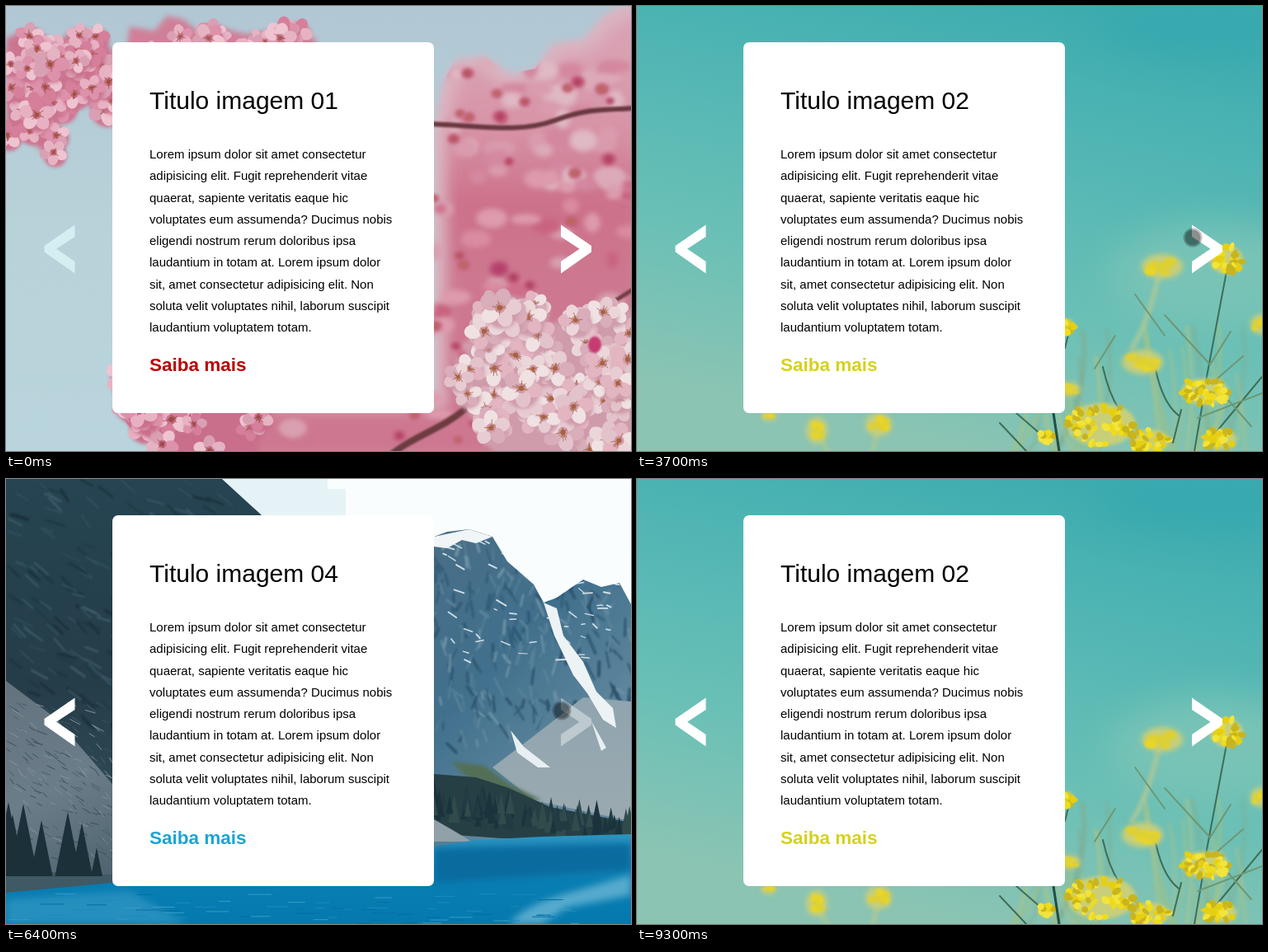
Write an HTML page with a canvas that moves like this. It is 758 px wide and 540 px high and loops after 10 s.

```html
<!DOCTYPE html>
<html lang="pt">
<head>
<meta charset="utf-8">
<style>
html, body { margin: 0; width: 100%; height: 100%; overflow: hidden; }
#stage { position: relative; width: 758px; height: 540px; overflow: hidden; }
#stage > * { position: absolute; left: 0; top: 0; }
#stage > #card { left: 129px; top: 44px; width: 390px; height: 450px; border-radius: 7px;
  background: #fff; color: #000; font-family: "Liberation Sans", Arial, sans-serif; white-space: nowrap; }
#card > * { position: absolute; left: 45px; margin: 0; }
h1 { top: 56px; font: 30px/30px "Liberation Sans", Arial, sans-serif; }
p { top: 123px; font-size: 15px; line-height: 26.25px; }
b { top: 380px; font-size: 22.5px; line-height: 24px; }
</style>
</head>
<body>
<div id="stage">
  <div id="card">
    <h1 id="title"></h1>
    <p>Lorem ipsum dolor sit amet consectetur<br>adipisicing elit. Fugit reprehenderit vitae<br>quaerat, sapiente veritatis eaque hic<br>voluptates eum assumenda? Ducimus nobis<br>eligendi nostrum rerum doloribus ipsa<br>laudantium in totam at. Lorem ipsum dolor<br>sit, amet consectetur adipisicing elit. Non<br>soluta velit voluptates nihil, laborum suscipit<br>laudantium voluptatem totam.</p>
    <b id="more">Saiba mais</b>
  </div>
  <svg width="758" height="540">
    <path id="prev" d="M83.5 265.5L46.5 291V298.5L83.5 324.5V310L61 294.8L83.5 280Z"/>
    <rect id="mark" x="673" y="265" width="37" height="60" fill="#9fa7a9"/>
    <path id="next" d="M673 265.5L710 291V298.5L673 324.5V310L695.5 294.8L673 280Z"/>
    <g id="cursor">
      <circle r="11.5" fill="#000" opacity=".24"/>
      <circle r="9.5" fill="#000" opacity=".27"/>
    </g>
  </svg>
</div>
<script>
const W = 758, H = 540, TAU = Math.PI * 2;
const el = id => document.getElementById(id);
let seed = 7;
const rnd = (a = 0, b = 1) => {
  seed = (seed * 16807) % 2147483647;
  return a + (b - a) * seed / 2147483647;
};
const pick = list => list[Math.floor(rnd() * list.length)];
const times = (n, fn) => { for (let i = 0; i < n; i++) fn(i); };

let g;
function fill(color, d) { g.fillStyle = color; g.fill(new Path2D(d)); }
function line(color, width, d) { g.strokeStyle = color; g.lineWidth = width; g.stroke(new Path2D(d)); }
function oval(color, x, y, rx, ry = rx, turn = 0) {
  g.fillStyle = color;
  g.beginPath();
  g.ellipse(x, y, rx, ry, turn, 0, TAU);
  g.fill();
}
function sky(x0, y0, x1, y1, ...colors) {
  const grad = g.createLinearGradient(x0, y0, x1, y1);
  colors.forEach((c, i) => grad.addColorStop(i / (colors.length - 1), c));
  return grad;
}
function within(d, draw) {
  g.save();
  g.clip(new Path2D(d));
  draw();
  g.restore();
}
function soft(px, draw) {
  g.filter = `blur(${px}px)`;
  draw();
  g.filter = 'none';
}
const ALL = 'M0 0H758V540H0Z';

function flower(x, y, r, tones, shade, heart) {
  const turn = rnd(0, TAU);
  soft(2, () => oval(shade, x + 2, y + 4, r * .85));
  soft(.7, () => {
    times(5, i => {
      const a = turn + i * TAU / 5, cx = Math.cos(a), cy = Math.sin(a) * .85;
      oval(pick(tones), x + cx * r * .6, y + cy * r * .6, r * .46, r * .38, a);
    });
    oval(shade, x, y, r * .26);
  });
  times(9, () => {
    const a = rnd(0, TAU), d = rnd(.15, .45) * r;
    line(heart, .8, `M${x} ${y}L${x + Math.cos(a) * d} ${y + Math.sin(a) * d}`);
  });
  oval(heart, x, y, r * .13);
}
// Flowers centred inside an outline; their petals make its ragged edge.
function cluster(d, n, r, tones, shade, heart) {
  const area = new Path2D(d);
  soft(3, () => fill(shade, d));
  while (n > 0) {
    const x = rnd(0, W), y = rnd(0, H);
    if (!g.isPointInPath(area, x, y)) continue;
    flower(x, y, rnd(.75, 1.15) * r, tones, shade, heart);
    n--;
  }
}

function blossoms() {
  fill(sky(0, 0, 0, H, '#b1c7d4', '#b8d2d9', '#b9d4dc'), ALL);
  const mass = 'M519 145L530 92L545 65L580 60L612 82L642 76L662 46L700 40L724 12L745 0H770V550H300V490H519Z';
  soft(4, () => fill('#dbb3c0', mass));
  within(mass, () => {
    soft(8, () => fill(sky(0, 60, 0, 330, '#d9a0b2', '#d793a6', '#cc7189', '#cd7890'), 'M535 155L548 95L570 75L605 100L650 92L675 62L710 55L740 25L770 10V550H300V490H535Z'));
    soft(3, () => {
      times(45, () => oval(pick(['#dfb9c4', '#d99bad', '#d488a0', '#dcaab8']), rnd(515, 758), rnd(70, 225), rnd(8, 20), rnd(6, 14)));
      times(90, () => oval(pick(['#d98ba0', '#cf6e89', '#c96480', '#dd9bad', '#d8a0b0']), rnd(300, 758), rnd(205, 540), rnd(7, 20), rnd(5, 12)));
    });
    soft(2, () => times(65, () => {
      const x = rnd(330, 758), y = rnd(75, 540), r = rnd(5, 10);
      oval('#c8607f', x, y, r, r * .8);
      oval(pick(['#b0555c', '#b76a58', '#ae4260']), x, y, r * .5);
    }));
    soft(3, () => oval('#b43f6c', 598, 319, 11, 9));
  });
  soft(1, () => {
    line('#693840', 6, 'M515 143C580 146 625 154 665 139S720 127 762 124');
    line('#6d3b40', 8, 'M460 550C495 520 525 516 557 489');
    line('#6d3b40', 5, 'M735 360L762 343');
  });

  const pinks = ['#e8b0c3', '#dd91aa', '#eec4d1', '#d57f9b', '#e6b3c3', '#d9a0b3'];
  cluster('M0 40L20 30L45 34L60 50L78 30L110 32L130 55V130L112 140L101 120L75 115L62 130L70 180L48 180L28 162L0 167Z', 42, 20, pinks, '#cc7590', '#a0523f');
  cluster('M150 25L180 30L195 12L215 16L235 32L260 26L290 34L345 27L378 42L370 60H145Z', 24, 17, pinks, '#cf8098', '#a85a55');
  cluster('M134 400H180V485H310L308 545H190L165 518L150 494Z', 30, 20, pinks, '#c96f8b', '#9c4a48');
  cluster('M540 415L556 435L565 390L588 362L610 352L640 358L655 385L700 380L735 365L770 370V550H600L580 515L558 490Z', 75, 22,
    ['#ebd6da', '#e3c3cb', '#f0e1e2', '#d9adba', '#e7ccd2', '#e2b5c1'], '#cf9cab', '#a9623f');
  soft(1, () => oval('#c63b72', 714, 411, 8, 10));
}

function yellowField() {
  fill(sky(520, 0, 400, H, '#3eacb0', '#54b7b4', '#6bc0b6', '#8bc4b3'), ALL);
  soft(22, () => {
    oval('#37a9af', 690, 25, 130, 35);
    oval('#78c3b6', 700, 330, 130, 65);
  });
  within('M519 300H758V540H130V495H519Z', () => soft(2, () => {
    times(28, () => {
      const x = rnd(460, 758), y = rnd(370, 500);
      line(pick(['#98c18e', '#7fae92', '#a4c48c']), rnd(2, 4), `M${x} ${y}Q${x + 12} ${y + 60} ${x + rnd(-40, 40)} 545`);
    });
    line('#a4c79c', 6, 'M632 330Q618 390 600 415M218 520L235 545M293 510L285 545');
  }));
  line('#3e6e57', 2, 'M505 494L512 540M524 395L519 415M565 438Q572 470 585 490M627 430Q635 480 657 497M715 322Q702 390 690 455M688 470L676 540M660 490L650 530M440 506L472 540M460 494L490 520M758 450L700 520');
  line('#6d9873', 2, 'M640 375L695 435L720 395M604 350L640 400M735 425L697 458M580 400L555 440M758 470L680 500M745 510L710 470');
  const tuft = (x, y, w, h, blurred) => {
    soft(blurred ? 3 : 2, () => oval('#c9cf78', x, y, w, h));
    if (blurred) return soft(1.5, () => times(9, () =>
      oval(pick(['#e7d52a', '#ded034']), x + rnd(-.6, .6) * w, y + rnd(-.5, .5) * h, w * .28, h * .3)));
    times(w * 1.5, () => {
      const a = rnd(0, TAU), d = Math.sqrt(rnd());
      oval(pick(['#eedb1c', '#e6cf13', '#f3e43c', '#c8b51e']), x + Math.cos(a) * d * w, y + Math.sin(a) * d * h, rnd(3, 6), rnd(2, 5), a);
    });
  };
  tuft(637, 316, 25, 15, 1);
  tuft(613, 432, 25, 15, 1);
  tuft(756, 386, 12, 12, 1);
  tuft(218, 515, 13, 16, 1);
  tuft(293, 508, 16, 14, 1);
  tuft(160, 498, 9, 6, 1);
  tuft(524, 465, 14, 8, 1);
  tuft(715, 308, 20, 17);
  tuft(689, 468, 29, 16);
  tuft(523, 389, 7, 9);
  tuft(563, 508, 42, 26);
  tuft(622, 528, 23, 14);
  tuft(707, 526, 20, 12);
  tuft(496, 524, 10, 7);
  line('#234e40', 3, 'M505 494L512 540');
}

function dunes() {
  fill(sky(0, 120, 758, 60, '#fddb79', '#ffd778', '#ffc873', '#fcb274'), ALL);
  soft(14, () => {
    oval('#ffe284', 50, 25, 75, 35);
    oval('#ffd179', 480, 15, 120, 18);
    fill('#feca81', 'M519 70L758 190V270L519 235Z');
  });
  soft(2, () => {
    fill('#fdc67f', 'M519 130L758 262H680L519 190Z');
    fill('#fbd27e', 'M519 165L590 200L540 240H519Z');
  });
  fill(sky(0, 265, 0, 500, '#f5ae7c', '#ef9e7a', '#e68b78'), 'M0 275L30 277L68 268L100 272L129 278H519V540H0Z');
  soft(2, () => {
    fill('#ec9678', 'M0 360L40 372L80 395L129 402V545H0Z');
    fill('#e28578', 'M0 468L55 480L129 494H420L400 545H0Z');
    fill('#d97c76', 'M0 510L80 515L150 524L250 520L390 545H0Z');
  });
  fill(sky(0, 225, 0, 480, '#eb977b', '#ec9b7b', '#e28778'), 'M519 250Q558 228 625 224Q664 224 690 238Q726 255 758 265V540H519Z');
  soft(5, () => {
    fill('#f0a77e', 'M519 305L560 350L610 405L560 395L519 365Z');
    fill('#e58d78', 'M640 235L720 265L758 350V400L690 365Z');
    fill('#ee9f7c', 'M590 385L650 355L758 385V430L690 403Z');
  });
  fill(sky(0, 405, 0, 540, '#d07972', '#c97371'), 'M380 540L410 494L519 463L545 474L580 468Q610 420 650 409Q680 402 710 417L758 455V540Z');
  fill('#c97270', 'M560 540Q600 495 640 480L758 490V540Z');
}

function lake() {
  fill('#fafdfd', ALL);
  fill('#e6f3f6', 'M255 0H390V12H412V44H300Z');
  const left = 'M0 0H262L310 44L330 75V500H0Z';
  const right = 'M519 70L535 64L562 61L590 70L608 100L640 128L652 150L668 144L700 122L722 131L744 126L758 152V450H519Z';
  fill(sky(0, 0, 0, 490, '#264452', '#253d49', '#34505d'), left);
  within(left, () => {
    soft(1, () => times(250, () => {
      const x = rnd(0, 310), y = rnd(0, 310);
      line(pick(['#1c3542', '#345262', '#3d5a68', '#1b303b']), rnd(1, 3), `M${x} ${y}l${rnd(8, 22)} ${rnd(4, 16)}`);
    }));
    fill(sky(0, 250, 130, 490, '#63737e', '#6b7d89', '#4d626e'), 'M0 245L60 290L129 370V490H0Z');
    times(190, () => {
      const x = rnd(0, 129), y = rnd(270, 480);
      line(pick(['#4a5d69', '#82929b', '#38505c']), 1, `M${x} ${y}l${rnd(4, 12)} ${rnd(2, 9)}`);
    });
  });
  fill(sky(519, 60, 758, 300, '#496e86', '#41708d', '#658ba0'), right);
  within(right, () => {
    soft(1, () => times(280, () => {
      const x = rnd(519, 758), y = rnd(70, 330);
      line(pick(['#315b77', '#5a829a', '#2d536d', '#6d91a5']), rnd(1, 4), `M${x} ${y}l${rnd(-8, 12)} ${rnd(6, 22)}`);
    }));
    times(65, () => {
      const x = rnd(519, 758), y = rnd(65, 220);
      line('#cfdfe7', rnd(1, 2), `M${x} ${y}l${rnd(3, 12)} ${rnd(-2, 7)}`);
    });
    fill('#f0f5f7', 'M519 70L562 61L590 70L570 78L553 74L535 84L519 82Z');
    fill(sky(0, 260, 0, 420, '#8fa4af', '#9caab0'), 'M590 350L640 312L700 265L758 270V415L640 390Z');
    fill('#edf3f5', 'M652 150L668 157L676 190L700 222L716 258L736 278L740 302L724 292L705 260L688 238L665 190Z');
    fill('#e8eff2', 'M612 305L628 325L660 350L645 350L620 332ZM710 294L728 326L722 330Z');
    soft(2, () => fill('#536f55', 'M540 343L580 348L610 370L650 390L590 392Z'));
  });
  fill('#263f45', 'M519 358L570 362L610 375L660 398L758 417V436H600L519 430Z');
  const tree = (x, y, h, color) => fill(color, `M${x} ${y - h}L${x + h * .2} ${y}H${x - h * .2}Z`);
  times(85, () => {
    const x = rnd(519, 758);
    tree(x, 402 + (x - 519) * .12 + rnd(-7, 14), rnd(14, 35), pick(['#213b43', '#304b4c', '#1b333c']));
  });
  fill('#90a1a7', 'M519 413L540 425L565 440H519Z');
  fill(sky(0, 435, 0, 540, '#2b93bf', '#087eb3', '#0579ae'), 'M0 498L129 488L519 446L570 438L650 434L758 431V540H0Z');
  fill('#3f5965', 'M0 475L129 480V490L0 502Z');
  [3, 8, 21, 43, 75, 92, 110].forEach((x, i) => tree(x, 482, [90, 75, 88, 68, 78, 65, 35][i], '#1b3039'));
  soft(4, () => {
    fill('#0a6b9f', 'M519 448L758 442V475L519 490Z');
    fill('#56aacd', 'M610 540Q630 515 690 500L758 480V505L680 520L650 540Z');
    fill('#258fbd', 'M0 510L150 500L220 540H0Z');
  });
  times(70, () => {
    const x = rnd(0, 740), y = rnd(503, 540);
    line(pick(['#1c8abb', '#046da3', '#389bc3']), 1, `M${x} ${y}h${rnd(8, 30)}`);
  });
}

const slides = [
  [blossoms, '#bd0004'], [yellowField, '#d5d21a'], [dunes, '#a23a18'], [lake, '#1aa4d7']
].map(([paint, color]) => {
  const canvas = document.createElement('canvas');
  canvas.width = W;
  canvas.height = H;
  g = canvas.getContext('2d');
  g.lineCap = 'round';
  paint();
  el('stage').prepend(canvas);
  return { canvas, color };
});

// [start ms, slide index]
const cuts = [[0, 0], [3600, 1], [4500, 2], [5300, 3], [7900, 2], [8400, 1]];
// [ms, x, y] of the pointer
const path = [
  [0, 330, -14], [100, 330, -14], [800, 75, 300], [2100, 75, 300], [2300, 272.5, 299.5],
  [2700, 621, 281], [2800, 621, 281], [3300, 674, 281], [6700, 674, 281], [7100, 11, 250],
  [7200, 11, 250], [7600, 61, 286], [8700, 61, 286], [9300, 330, -14], [10000, 330, -14]
];

function frame(now) {
  const t = Math.floor(now % 10000 / 100) * 100;
  const at = cuts.filter(c => c[0] <= t).pop()[1];
  slides.forEach((s, i) => s.canvas.style.display = i === at ? 'block' : 'none');
  el('title').textContent = `Titulo imagem 0${at + 1}`;
  el('more').style.color = slides[at].color;

  const marked = t >= 4500 && t < 4700 || t >= 5300 && t < 5400;
  el('mark').style.display = marked ? '' : 'none';
  el('prev').setAttribute('fill', at === 0 ? 'rgba(228,255,255,.65)' : '#fff');
  el('next').setAttribute('fill', marked ? '#a4e2fc' : at === 3 ? 'rgba(255,255,255,.4)' : '#fff');

  const i = path.findIndex(p => p[0] > t);
  const [t0, x0, y0] = path[i - 1], [t1, x1, y1] = path[i];
  const k = (t - t0) / (t1 - t0);
  el('cursor').setAttribute('transform', `translate(${x0 + (x1 - x0) * k} ${y0 + (y1 - y0) * k})`);
  requestAnimationFrame(tick);
}
const start = performance.now();
function tick() { frame(performance.now() - start); }
tick();
</script>
</body>
</html>
```
